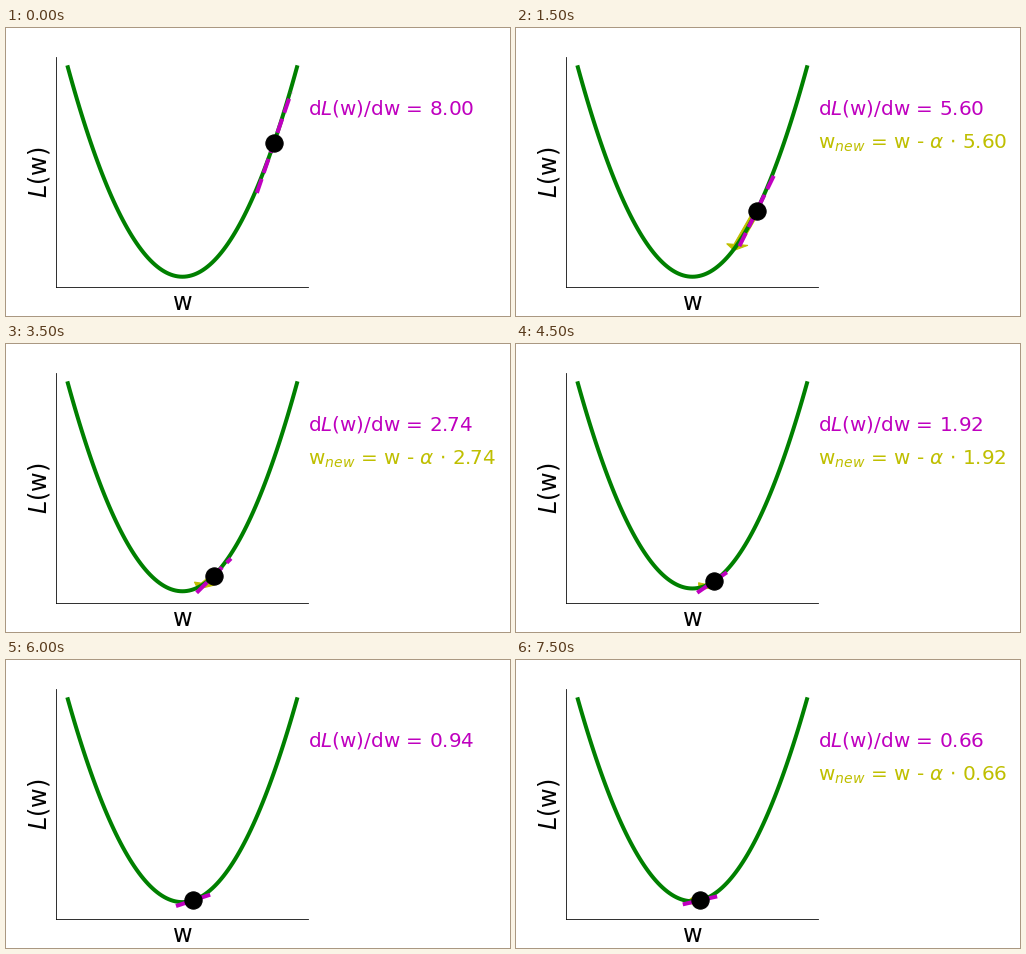
A matplotlib script that plays this animation: 504 by 288 pixels, repeating every 8000 ms.

```python
import matplotlib.pyplot as plt
import numpy as np
from matplotlib.animation import FuncAnimation

DPI = 72
STEPS = 8            # descent steps per loop, two frames each
RATE = 0.15          # learning rate
START = 4.0
HALF = 0.75          # half width of the tangent segment
DOT_AREA = 300
MARGIN = 0.05

plt.rcParams["font.family"] = "DejaVu Sans"


def loss(w):
    return w ** 2


def slope(w):
    return 2 * w


fig = plt.figure(figsize=(504 / DPI, 288 / DPI), dpi=DPI)
ax = fig.add_axes([0.1, 0.1, 0.5, 0.8])
ax.set_xticks([])
ax.set_yticks([])
ax.spines[["top", "right"]].set_visible(False)
ax.set_xlabel("w", fontsize=24)
ax.set_ylabel(r"$\it{L}$(w)", fontsize=24)

ws = np.linspace(-5, 5, 101)
top = loss(ws).max()
pad = MARGIN * np.ptp(ws)
ax.set_xlim(ws[0] - pad, ws[-1] + pad)

# dot radius in loss units, used to keep the dot inside the padded view
dot_radius = np.sqrt(DOT_AREA) / 2 / (288 * 0.8 / (1 + 2 * MARGIN) / top)

ax.plot(ws, loss(ws), "g", lw=4)
arrow = ax.arrow(0, 0, 1, 1, color="y", width=0.3, head_width=0.95,
                 head_length=0.72, zorder=1)
tangent, = ax.plot([], [], "m--", lw=4, zorder=3)
dot = ax.scatter([START], [loss(START)], s=DOT_AREA, c="k", zorder=4)


def note(y, color):
    return ax.text(1, y, "", color=color, fontsize=20, transform=ax.transAxes)


grad_note = note(0.75, "m")
step_note = note(0.6, "y")


def update(frame):
    step, stepping = divmod(frame, 2)
    w = START * (1 - 2 * RATE) ** step
    y, grad = loss(w), slope(w)

    span = np.array([-HALF, HALF])
    tangent.set_data(w + span, y + grad * span)
    dot.set_offsets([[w, y]])
    grad_note.set_text(rf"d$\it{{L}}$(w)/dw = {grad:.2f}")

    w_new = w - RATE * grad
    arrow.set_data(x=w, y=y, dx=w_new - w, dy=loss(w_new) - y)
    step_note.set_text(rf"w$_{{new}}$ = w - $\alpha$ $\cdot$ {grad:.2f}")
    for artist in (arrow, step_note):
        artist.set_visible(bool(stepping))

    low = min(0, y - grad * HALF, y - dot_radius)
    gap = MARGIN * (top - low)
    ax.set_ylim(low - gap, top + gap)
    return arrow, tangent, dot, grad_note, step_note


anim = FuncAnimation(fig, update, frames=2 * STEPS, interval=500,
                     repeat=True, repeat_delay=0, blit=False)
plt.show()
```
